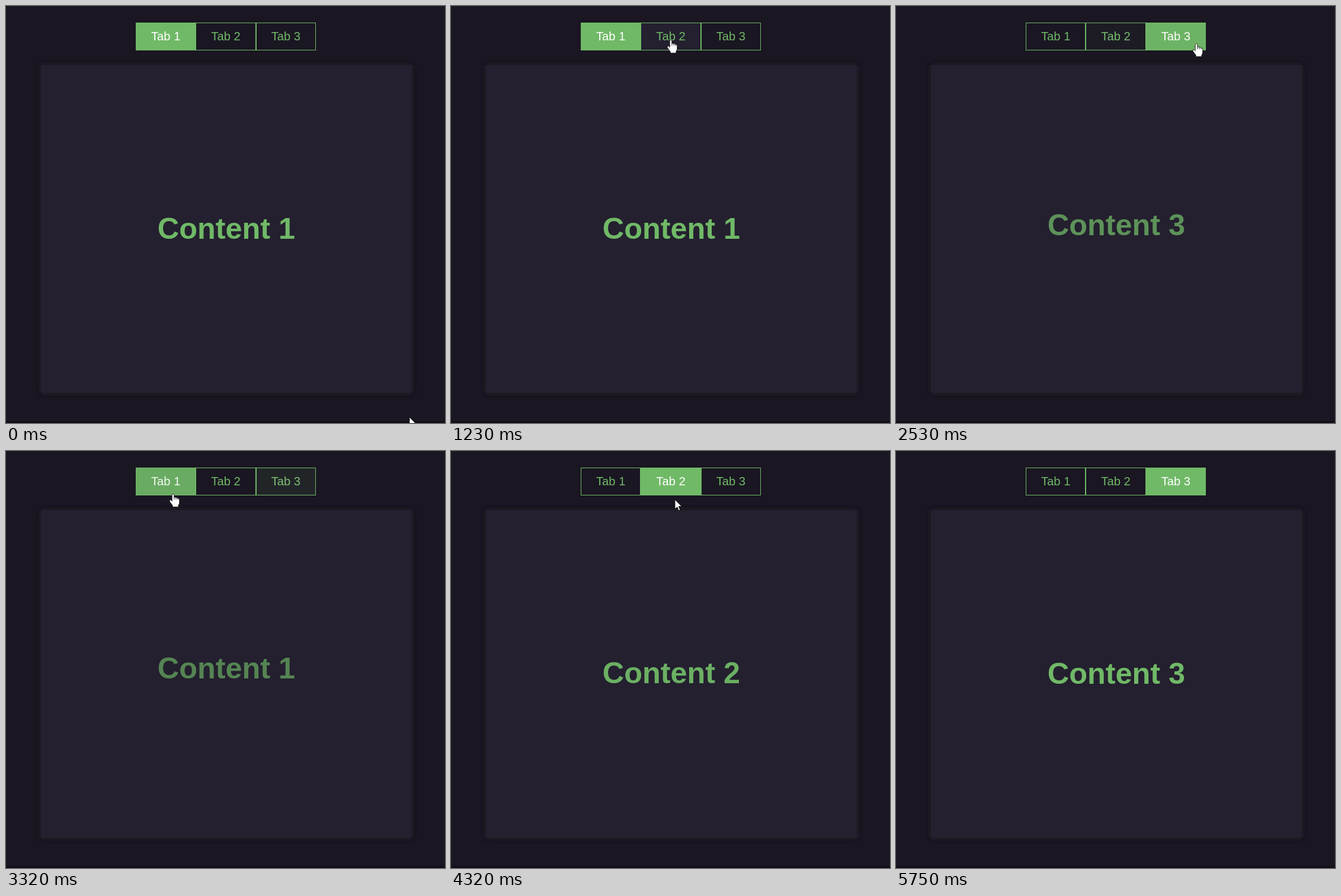
Write an HTML page that moves like this. It is 741 px wide and 704 px high and loops after 6.44 s.

```html
<!DOCTYPE html>
<html lang="en">
<head>
<meta charset="utf-8">
<title>Tabs</title>
<style>
  html, body { margin: 0; width: 100%; height: 100%; overflow: hidden; background: #1a1622; }
  svg { display: block; width: 741px; height: 704px; }
  text { font-family: "Liberation Sans", Arial, sans-serif; }
  .tab { font-size: 20.2px; }
  .tab-box { stroke: #70b967; }
  #content { font-size: 50.4px; font-weight: bold; fill: #70b967; }
  #panel { fill: #24202f; }
  .cursor { fill: #fff; stroke: #000; stroke-width: .8; stroke-linejoin: round; }
</style>
</head>
<body>
<svg viewBox="0 0 741 704">
  <defs>
    <filter id="blur" x="-10%" y="-10%" width="120%" height="120%">
      <feGaussianBlur stdDeviation="5"/>
    </filter>
  </defs>
  <rect width="741" height="704" fill="#1a1622"/>
  <rect y="701" width="741" height="3" fill="#140d18"/>
  <rect x="58.5" y="99.5" width="627" height="554" rx="4" fill="#1d1b1d" filter="url(#blur)"/>
  <rect id="panel" x="58.5" y="99.5" width="627" height="554" rx="4"/>
  <g id="tabs"></g>
  <text id="content" x="255.8" y="393"></text>
  <g id="arrow" class="cursor">
    <path d="M0 0V16L3.8 12.6L6.3 18.5L8.8 17.4L6.3 11.6H11.3Z"/>
  </g>
  <g id="hand" class="cursor">
    <path d="M-1.8 1.5Q0 -.9 1.8 1.5V6.4Q3.6 5.2 5 6.8Q7 6 8 8Q10.5 7.4 10.8 10V15.2Q10.4 18 9 19.8V22.4H-.8V20.2Q-3.2 16.8 -6 13Q-6.6 9.8 -3.8 10.6L-1.8 12.6Z"/>
    <path d="M1.9 6.6V10M5 7V10M8 8.2V10.4" fill="none"/>
  </g>
</svg>
<script>
const LOOP = 6440, TAB_FADE = 300, SLIDE = 500, RISE = 25;
const LEFT = 219, TOP = 28, BOTTOM = 75, TAB_WIDTH = 304 / 3;
const GREEN = [112, 185, 103];
const LOOKS = {
  idle: { bg: [26, 22, 34], ink: GREEN },
  hover: { bg: [36, 32, 47], ink: GREEN },
  active: { bg: GREEN, ink: [255, 255, 255] }
};

// [time, tab]
const CLICKS = [[-SLIDE, 0], [1290, 1], [2305, 2], [3130, 0], [3965, 1], [4995, 2]];

// [time, x, y] of the pointer tip at its turns and rests
const PATH = [
  [0, 682, 695], [420, 430, 250], [670, 340, 135], [1180, 371, 57], [1300, 371, 57],
  [1480, 405, 76], [1730, 460, 80], [2170, 508, 63], [2530, 507, 63], [3000, 262, 70],
  [3970, 360, 74.6], [4300, 376, 82], [4850, 465, 68], [5000, 465, 68], [5040, 463, 75.4],
  [5560, 723, 545], [5750, 709, 710]
];

const $ = id => document.getElementById(id);
const mix = (a, b, k) => a.map((v, i) => v + (b[i] - v) * k);
const rgb = c => `rgb(${c.map(Math.round)})`;
const lastIndex = (list, t) => list.findLastIndex(step => step[0] <= t);

// CSS "ease": cubic-bezier(.25, .1, .25, 1)
function ease(x) {
  if (x <= 0) return 0;
  if (x >= 1) return 1;
  const bezier = (a, b, s) => 3 * a * s * (1 - s) ** 2 + 3 * b * s * s * (1 - s) + s ** 3;
  let lo = 0, hi = 1;
  for (let i = 0; i < 20; i++) {
    const mid = (lo + hi) / 2;
    if (bezier(.25, .25, mid) < x) lo = mid; else hi = mid;
  }
  return bezier(.1, 1, lo);
}

// Smooth path that never overshoots its points
function slope(i, axis) {
  const rate = j => (PATH[j + 1][axis] - PATH[j][axis]) / (PATH[j + 1][0] - PATH[j][0]);
  if (i === 0) return rate(0);
  if (i === PATH.length - 1) return rate(i - 1);
  const a = rate(i - 1), b = rate(i);
  return a * b > 0 ? 2 * a * b / (a + b) : 0;
}

function pointer(t) {
  const i = lastIndex(PATH, t);
  if (i === PATH.length - 1) return null;
  const p = PATH[i], q = PATH[i + 1], d = q[0] - p[0], s = (t - p[0]) / d;
  return [1, 2].map(axis =>
    p[axis] * (1 + 2 * s) * (1 - s) ** 2 + q[axis] * s * s * (3 - 2 * s) +
    d * slope(i, axis) * s * (1 - s) ** 2 - d * slope(i + 1, axis) * s * s * (1 - s));
}

// Index of the tab under the pointer, or -1
function tabUnder(tip) {
  if (!tip || tip[1] < TOP || tip[1] >= BOTTOM) return -1;
  const i = Math.floor((tip[0] - LEFT) / TAB_WIDTH);
  return i >= 0 && i < 3 ? i : -1;
}

// Walk through the loop once and note when a tab changes state
function history(tab) {
  const steps = [];
  for (let t = 0; t < LOOP; t += 5) {
    const active = CLICKS[lastIndex(CLICKS, t)][1] === tab;
    const state = active ? "active" : tabUnder(pointer(t)) === tab ? "hover" : "idle";
    if (state !== steps.at(-1)?.[1]) steps.push([t, state]);
  }
  return steps;
}

// Each change starts from the colour reached by the one before
function lookAt(steps, t, i = lastIndex(steps, t)) {
  const [start, state] = steps[i], to = LOOKS[state];
  const k = ease((t - start) / TAB_FADE);
  if (i === 0 || k === 1) return to;
  const from = lookAt(steps, start, i - 1);
  return { bg: mix(from.bg, to.bg, k), ink: mix(from.ink, to.ink, k) };
}

function add(tag, attrs) {
  const el = document.createElementNS("http://www.w3.org/2000/svg", tag);
  for (const key in attrs) el.setAttribute(key, attrs[key]);
  return $("tabs").appendChild(el);
}

const tabs = [0, 1, 2].map(i => {
  const edge = n => Math.round(LEFT + n * TAB_WIDTH);
  const box = add("rect", {
    class: "tab-box", x: edge(i) + .5, y: TOP + .5,
    width: edge(i + 1) - edge(i) - 1, height: BOTTOM - TOP - 1
  });
  const label = add("text", { class: "tab", x: LEFT + 26 + i * TAB_WIDTH, y: 58 });
  label.textContent = "Tab " + (i + 1);
  return { steps: history(i), box, label };
});

function draw(t) {
  for (const { steps, box, label } of tabs) {
    const look = lookAt(steps, t);
    box.style.fill = rgb(look.bg);
    label.style.fill = rgb(look.ink);
  }

  const [start, tab] = CLICKS[lastIndex(CLICKS, t)];
  const k = ease((t - start) / SLIDE), content = $("content");
  content.textContent = "Content " + (tab + 1);
  content.setAttribute("opacity", k);
  content.setAttribute("transform", `translate(0 ${-RISE * (1 - k)})`);

  const tip = pointer(t), overTab = tabUnder(tip) >= 0;
  for (const id of ["arrow", "hand"]) {
    const shown = tip && (id === "hand") === overTab;
    $(id).style.display = shown ? "" : "none";
    if (shown) $(id).setAttribute("transform", `translate(${tip.map(Math.round)})`);
  }
}

const begin = performance.now();
function tick() {
  draw((performance.now() - begin) % LOOP);
  requestAnimationFrame(tick);
}
tick();
</script>
</body>
</html>
```
